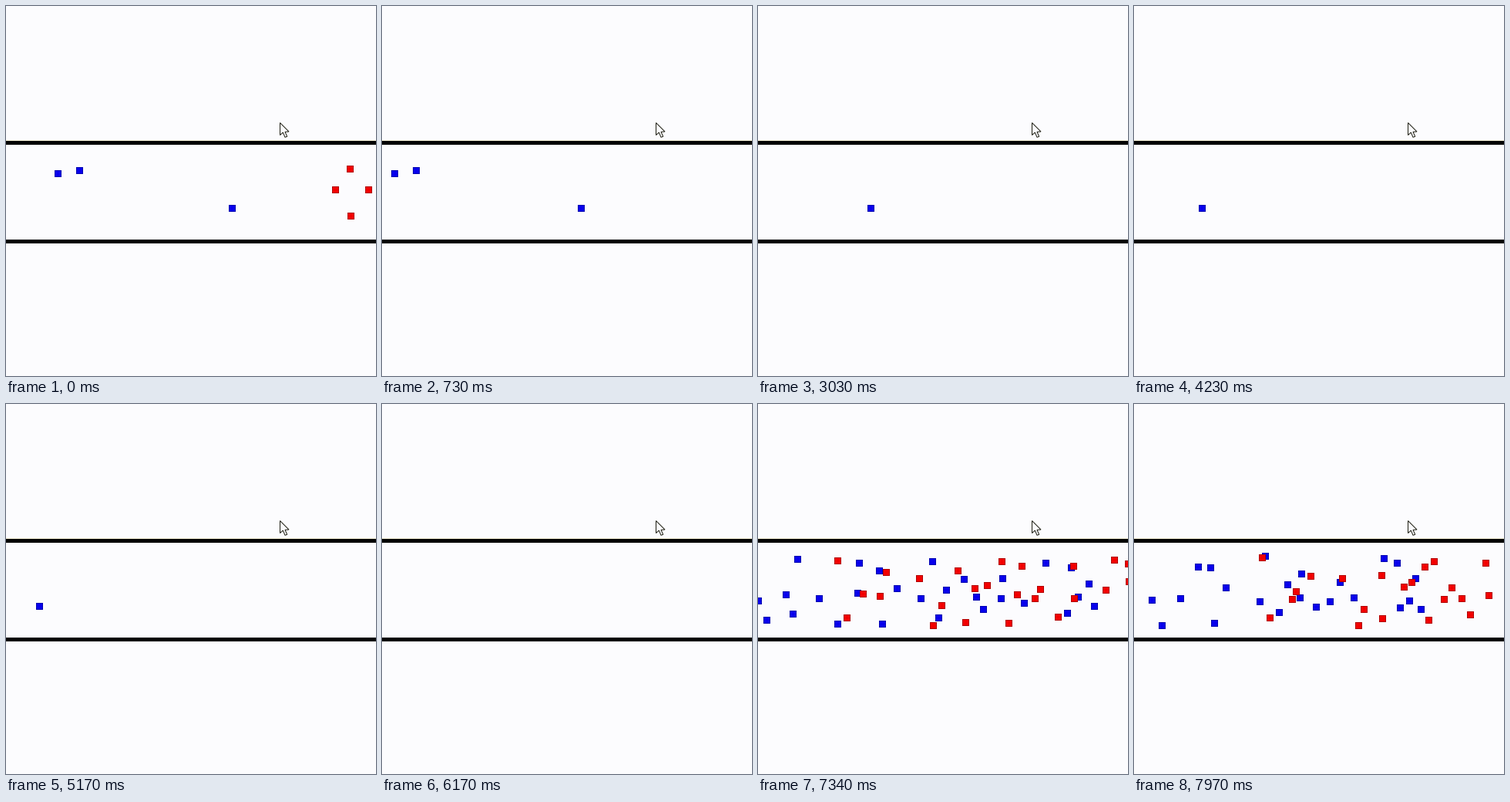
Animation, 480 px wide and 480 px high, one loop 8 s. Source, as a matplotlib script:

```python
import numpy as np
import matplotlib.pyplot as plt
from matplotlib.animation import FuncAnimation
from matplotlib.collections import PolyCollection
from matplotlib.patches import Polygon, Rectangle

SIZE, DPI = 480, 100
LOOP, STEP = 8000, 20
CROWD_START = 6700
BACK = "#fcfcfe"

rng = np.random.default_rng(12)


def scatter(count, left, right):
    """Evenly loose points: keep the candidate farthest from the others."""
    low, high = (left, 199), (right, 285)
    points = [rng.uniform(low, high)]
    while len(points) < count:
        tries = rng.uniform(low, high, (8, 2))
        gaps = np.linalg.norm(tries[:, None] - np.array(points), axis=2)
        points.append(tries[gaps.min(axis=1).argmax()])
    return np.array(points)


class Crowd:
    """Walkers of one colour: a few stragglers, then a full corridor."""

    def __init__(self, late, late_speed, count, span, pace, fill, edge, z):
        self.late = np.array(late, float)
        self.late_speed = late_speed
        self.start = scatter(count, *span)
        self.speed = pace * rng.uniform(0.78, 1.22, count)
        self.phase = rng.uniform(0, 2 * np.pi, count)
        self.shape = PolyCollection([], facecolors=[edge, fill], edgecolors="none",
                                    antialiaseds=False, zorder=z)
        ax.add_collection(self.shape, autolim=False)

    def places(self, t):
        if t < CROWD_START:
            return self.late + [self.late_speed * t / 1000, 0]
        s = (t - CROWD_START) / 1000
        x, y = self.start.T
        sway = 6 * (np.sin(self.phase + 2 * s) - np.sin(self.phase))
        return np.column_stack([x + self.speed * s, np.clip(y + sway, 195, 287)])

    def draw(self, t):
        centres = np.floor(self.places(t)) + 0.5
        self.shape.set_verts([square(x, y, r) for x, y in centres for r in (4.5, 3.5)])
        return self.shape


def square(x, y, r):
    return [(x - r, y - r), (x + r, y - r), (x + r, y + r), (x - r, y + r)]


fig = plt.figure(figsize=(SIZE / DPI, SIZE / DPI), dpi=DPI, facecolor=BACK)
ax = fig.add_axes([0, 0, 1, 1])
ax.set_xlim(0, SIZE)
ax.set_ylim(SIZE, 0)
ax.axis("off")

crowds = [
    Crowd([(67, 217), (95, 213)], -70, 29, (62, 505), -92,
          "#0800ec", "#0000b0", 2),
    Crowd([(427, 238), (446, 211), (470, 238), (447, 272)], 85, 27, (32, 462), 92,
          "#f20000", "#b00000", 3),
    Crowd([(293, 262)], -48.4, 1, (-40, -30), -92,
          "#0800ec", "#0000b0", 2),
]

ax.add_patch(Rectangle((0, 174), SIZE, 1, color="#f4efd4", lw=0, zorder=4))
for top in (175, 303):
    ax.add_patch(Rectangle((0, top), SIZE, 5, color="black", lw=0, zorder=4))

pointer = [(355.5, 151.5), (355.5, 167.5), (359.3, 164), (362, 170.3),
           (364.7, 169.3), (362, 163.3), (367, 163)]
ax.add_patch(Polygon(pointer, closed=True, fc=BACK, ec="#1c1c10",
                     lw=72 / DPI, joinstyle="miter", zorder=5))


def draw(n):
    return [crowd.draw(n * STEP) for crowd in crowds]


anim = FuncAnimation(fig, draw, frames=LOOP // STEP, interval=STEP,
                     repeat=True, repeat_delay=0, blit=False)
plt.show()
```
